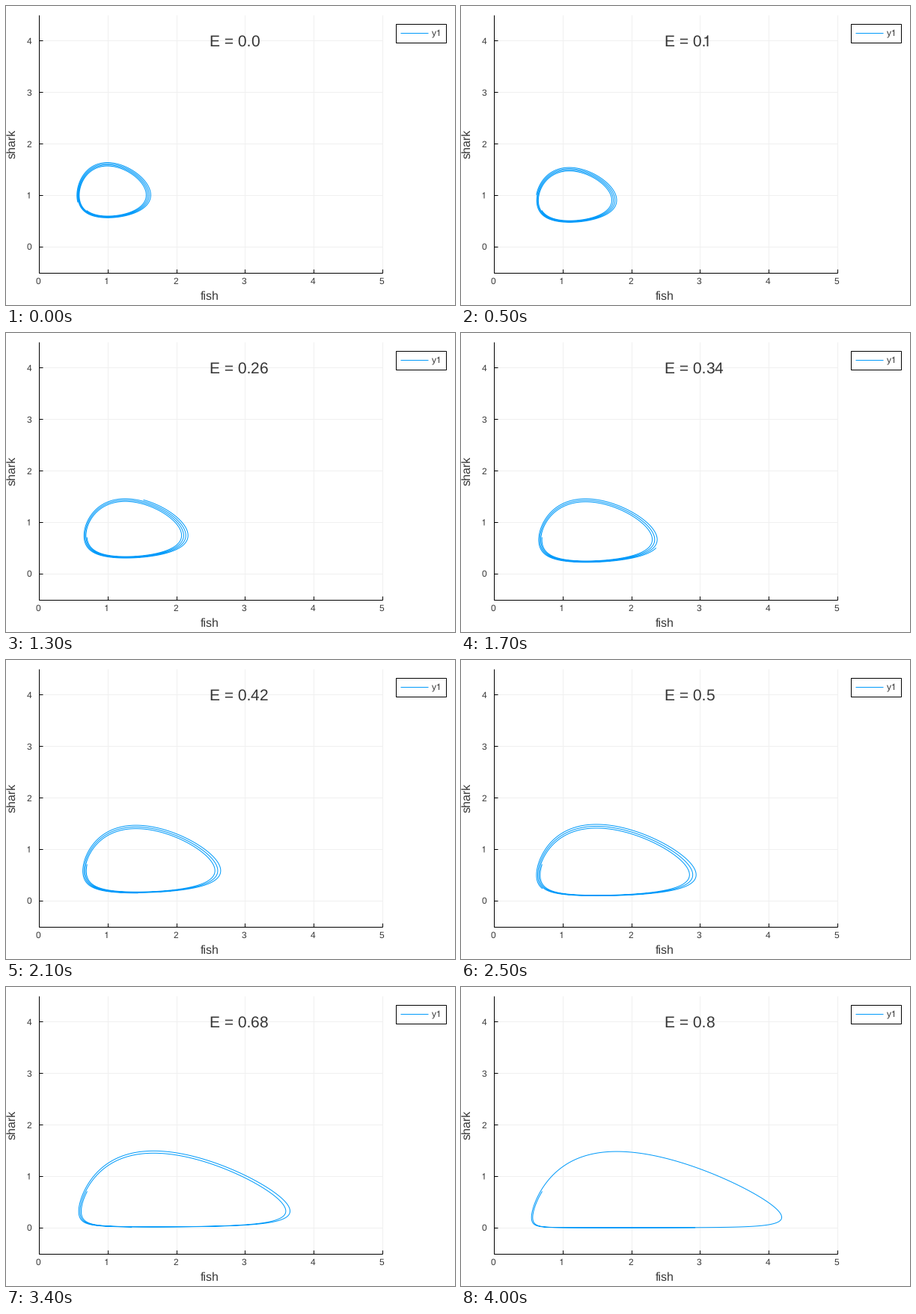
Animation of 600x400 px, one loop 4050 ms. Source, as a matplotlib script:

```python
import numpy as np
import matplotlib.pyplot as plt
from matplotlib.animation import FuncAnimation
from matplotlib.patches import Polygon, Rectangle

plt.rcParams["font.family"] = "Liberation Sans"
plt.rcParams["text.hinting"] = "none"
plt.rcParams["text.hinting_factor"] = 1
plt.rcParams["path.simplify"] = False

W, H, DPI = 600, 400, 100
PX = 72 / DPI
FRAMES, INTERVAL = 81, 50
STEPS, DT = 2500, 0.01
LEFT, RIGHT, TOP, BOTTOM = 44, 503, 12, 356.5
BLUE, INK, GRID = "#009afa", "#363636", "#f0f0f0"
BIG, MID, SMALL = 20.8, 16.2, 11.9
DIGIT = 0.556  # digit advance in em

# A "1" without a foot, in em units
ONE = np.array([(.259, .505), (.102, .505), (.102, .568), (.178, .580),
                (.228, .603), (.260, .645), (.289, .709), (.347, .709),
                (.347, 0), (.259, 0)])


def sx(x):
    return LEFT + (RIGHT - LEFT) * x / 5


def sy(y):
    return BOTTOM - (BOTTOM - TOP) * (y + 0.5) / 5


def orbits(effort):
    """Explicit Euler for the fished predator-prey system, all efforts at once."""
    x = np.full((STEPS + 1, len(effort)), 0.7)
    y = x.copy()
    for n in range(STEPS):
        x[n + 1] = x[n] + DT * x[n] * (1 - y[n] - effort)
        y[n + 1] = y[n] + DT * y[n] * (x[n] - 1 - effort)
    return sx(x), sy(y)


fig = plt.figure(figsize=(W / DPI, H / DPI), dpi=DPI, facecolor="white")
ax = fig.add_axes([0, 0, 1, 1])
ax.set(xlim=(0, W), ylim=(H, 0))
ax.axis("off")


def rule(xs, ys, color="black", z=2):
    ax.plot(xs, ys, color=color, lw=PX, zorder=z, solid_capstyle="butt")


def label(x, y, s, size, **kw):
    kw = {"ha": "left", "va": "baseline", "color": INK, "zorder": 4, **kw}
    return ax.text(x, y, s, fontsize=size * PX, **kw)


def digits(x, y, s, size):
    """Set digits from a left origin; returns the artists."""
    made = []
    for k, ch in enumerate(s):
        left = x + k * DIGIT * size
        if ch == "1":
            glyph = Polygon(ONE * (size, -size) + (left, y), fc=INK, lw=0, zorder=4)
            made.append(ax.add_patch(glyph))
        else:
            made.append(label(left, y, ch, size))
    return made


for v in range(6):
    x = sx(v)
    if v:
        rule([x, x], [TOP, BOTTOM], GRID, 1)
    rule([x, x], [BOTTOM, BOTTOM - 5])
    digits(x - 1.2 - DIGIT * SMALL / 2, 372, str(v), SMALL)
for v in range(5):
    y = sy(v)
    rule([LEFT, RIGHT], [y, y], GRID, 1)
    rule([LEFT, LEFT + 5], [y, y])
    digits(34 - DIGIT * SMALL, y + 4.3, str(v), SMALL)
rule([LEFT, LEFT], [TOP, BOTTOM])
rule([LEFT, RIGHT], [BOTTOM, BOTTOM])

label(272.5, 393, "fish", MID, ha="center")
label(15.3, 184.5, "shark", MID, ha="right", va="center", rotation=90)

ax.add_patch(Rectangle((521, 23.5), 67, 25, fc="white", ec="black", lw=PX, zorder=2))
rule([527, 563.5], [36, 36], BLUE, 3)
label(569, 40, "y", SMALL)
digits(569 + 0.5 * SMALL, 40, "1", SMALL)

label(272, 54, "E = 0.", BIG)
curve, = ax.plot([], [], color=BLUE, lw=PX, zorder=3)

effort = np.arange(FRAMES) / 100
path_x, path_y = orbits(effort)
decimals = []


def draw(i):
    while decimals:
        decimals.pop().remove()
    curve.set_data(path_x[:, i], path_y[:, i])
    tail = str(round(i / 100, 2))[2:]
    kern = -0.18 * BIG if tail[0] == "1" else 0
    decimals.extend(digits(272 + 2.641 * BIG + kern, 54, tail, BIG))
    return [curve, *decimals]


anim = FuncAnimation(fig, draw, frames=FRAMES, init_func=lambda: [curve],
                     interval=INTERVAL, repeat=True, repeat_delay=0)
plt.show()
```
